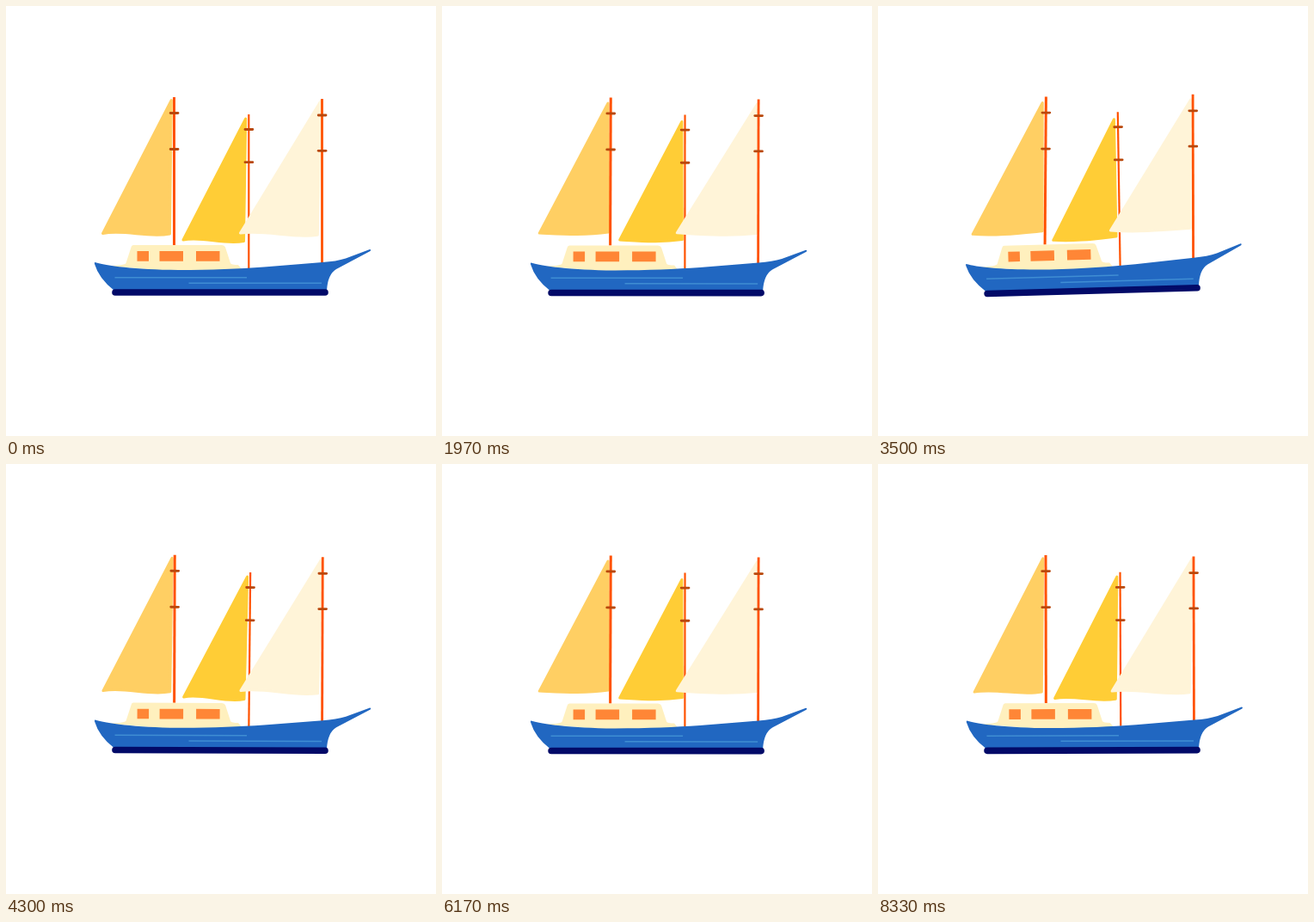
Animation of 500 by 500 pixels, one loop 8410 ms. Source, as an HTML page:

```html
<!DOCTYPE html>
<html lang="en">
<head>
<meta charset="utf-8">
<title>Sailing boat</title>
<style>
  html, body { margin: 0; width: 100%; height: 100%; overflow: hidden; background: #fff; }
  svg { display: block; width: 100%; height: 100%; }
  .sail { stroke-width: 3; stroke-linejoin: round; }
  .mast { stroke: #ff5200; }
  .bar { stroke: #b9480c; stroke-width: 2.8; stroke-linecap: round; }
</style>
</head>
<body>
<svg viewBox="0 0 500 500">
  <g id="boat">
    <g id="rig"></g>
    <path fill="#fff0be" d="M148 278H251Q254 278 255 280.500L261 299Q262 301 270 301L274 306L200 309L118 302Q138 302 139.500 299L145.500 280.500Q146 278 148 278Z"/>
    <path fill="#ff8636" d="M152.500 285H166V296.700H152.500ZM178.500 285H206V296.700H178.500ZM221 285H248.500V296.700H221Z"/>
    <path fill="#2167c1" d="M103.500 298C116 302 150 306.500 200 307C240 307 270 305.500 300 303.500L368 298Q384 297 395 293.500L423 283Q425 283 423.500 285L384 306Q374 312 373 331L126 331Q108 317 103 300Q102.500 298 103.500 298Z"/>
    <path fill="none" stroke="#3f8dd3" stroke-width="1.500" d="M126.500 315.800H280M212.500 322.300H367"/>
    <path stroke="#020a68" stroke-width="7.600" stroke-linecap="round" d="M127 333H371"/>
  </g>
</svg>
<script>
const LOOP = 8410, CYCLE = 60;

// Periodic smooth curve through [step, value] keys; the first key is at step 0.
function track(period, keys) {
  const n = keys.length;
  const key = i => {
    const turn = Math.floor(i / n), [s, v] = keys[i - turn * n];
    return [s + turn * period, v];
  };
  const slope = i => {
    const [a, va] = key(i - 1), [b, vb] = key(i + 1);
    return (vb - va) / (b - a);
  };
  return step => {
    const s = step % period;
    let i = 0;
    while (key(i + 1)[0] <= s) i++;
    const [a, va] = key(i), [b, vb] = key(i + 1);
    const d = b - a, u = (s - a) / d, u2 = u * u, u3 = u2 * u;
    return va * (2 * u3 - 3 * u2 + 1) + vb * (3 * u2 - 2 * u3)
      + d * (slope(i) * (u3 - 2 * u2 + u) + slope(i + 1) * (u3 - u2));
  };
}

const roll = track(CYCLE, [[0, 0], [8, 1.35], [17, 1.83], [24, 0.9], [30, -0.4], [34, -1.1], [40, -1.6], [46, -1.8], [52, -1.35]]);
const heave = track(CYCLE, [[0, 0], [8, -1.9], [17, -3], [24, -0.9], [30, 1], [34, 0.5], [40, -2.5], [46, -2.2], [52, -1.7]]);
const drift = track(CYCLE, [[0, 0], [17, 0.7], [40, -0.6]]);
const lift = track(CYCLE, [[0, 0], [5, 0.6], [17, 1], [30, 0.5], [40, 0], [55, -0.2]]);
const belly = track(CYCLE, [[0, 0], [17, 0], [28, 0.6], [40, 1], [52, 0.6]]);

// Offsets of apex, clew, two curve controls and tack for each sail shape.
const LIFT = [[1, 0], [2, -3], [0, -2.8], [0, 1.4], [1.7, 0]];
const BELLY = [[-1, 5], [-1, 2], [0, 11.5], [0, -6.5], [3, -4]];

const masts = [
  { x: 195.5, y: 278, top: 106, width: 3, bars: [124.5, 166.5], color: "#ffcf63",
    apex: [192.3, 109.5], clew: [112.5, 264.5], tack: [190.5, 265],
    tilt: track(30, [[0, 0], [10, 1.9], [17, 2.5]]) },
  { x: 282.3, y: 305, top: 126, width: 2.2, bars: [143.5, 181.7], color: "#ffcd36",
    apex: [278.7, 131], clew: [206, 272], tack: [276.5, 273.5],
    tilt: track(30, [[0, 0], [1, 0.4], [10, 2.6], [17, 1.05], [28, 0]]) },
  { x: 367.5, y: 299, top: 108, width: 2.8, bars: [127, 168.3], color: "#fff4d8",
    apex: [366, 110.5], clew: [272.5, 264], tack: [362.3, 266.3],
    tilt: track(30, [[0, 0], [10, 1.6], [17, 1.8]]) }
];

function add(parent, tag, attrs) {
  const node = document.createElementNS("http://www.w3.org/2000/svg", tag);
  for (const name in attrs) node.setAttribute(name, attrs[name]);
  return parent.appendChild(node);
}

const boat = document.getElementById("boat");
const rig = document.getElementById("rig");
for (const m of masts) {
  m.group = add(rig, "g", {});
  m.sail = add(m.group, "path", { class: "sail", fill: m.color, stroke: m.color });
  add(m.group, "path", { class: "mast", "stroke-width": m.width, d: `M${m.x} ${m.y}V${m.top}` });
  for (const y of m.bars) add(m.group, "path", { class: "bar", d: `M${m.x - 4.3} ${y}h8.800` });
  const control = (t, dy) => [0, 1].map(k => m.clew[k] + (m.tack[k] - m.clew[k]) * t + k * dy);
  m.points = [m.apex, m.clew, control(0.33, -5), control(0.67, 5), m.tack];
}

function draw(step) {
  boat.setAttribute("transform",
    `translate(${drift(step)} ${heave(step)}) rotate(${roll(step)} 250 315)`);
  const up = lift(step), full = belly(step);
  for (const m of masts) {
    const [apex, clew, c1, c2, tack] = m.points.map((p, i) =>
      p.map((v, k) => (v + up * LIFT[i][k] + full * BELLY[i][k]).toFixed(2)).join(" "));
    m.sail.setAttribute("d", `M${apex}L${clew}C${c1} ${c2} ${tack}Z`);
    m.group.setAttribute("transform", `rotate(${m.tilt(step)} ${m.x} ${m.y})`);
  }
}

// Poses change every 70 ms, snapped up to a 30 fps clock.
const start = performance.now();
function tick(now) {
  const time = Math.max(0, now - start) % LOOP;
  const ticks = Math.floor((time + 4) * 0.03);
  draw(Math.floor(ticks * 10 / 21) % CYCLE);
  requestAnimationFrame(tick);
}
draw(0);
requestAnimationFrame(tick);
</script>
</body>
</html>
```
